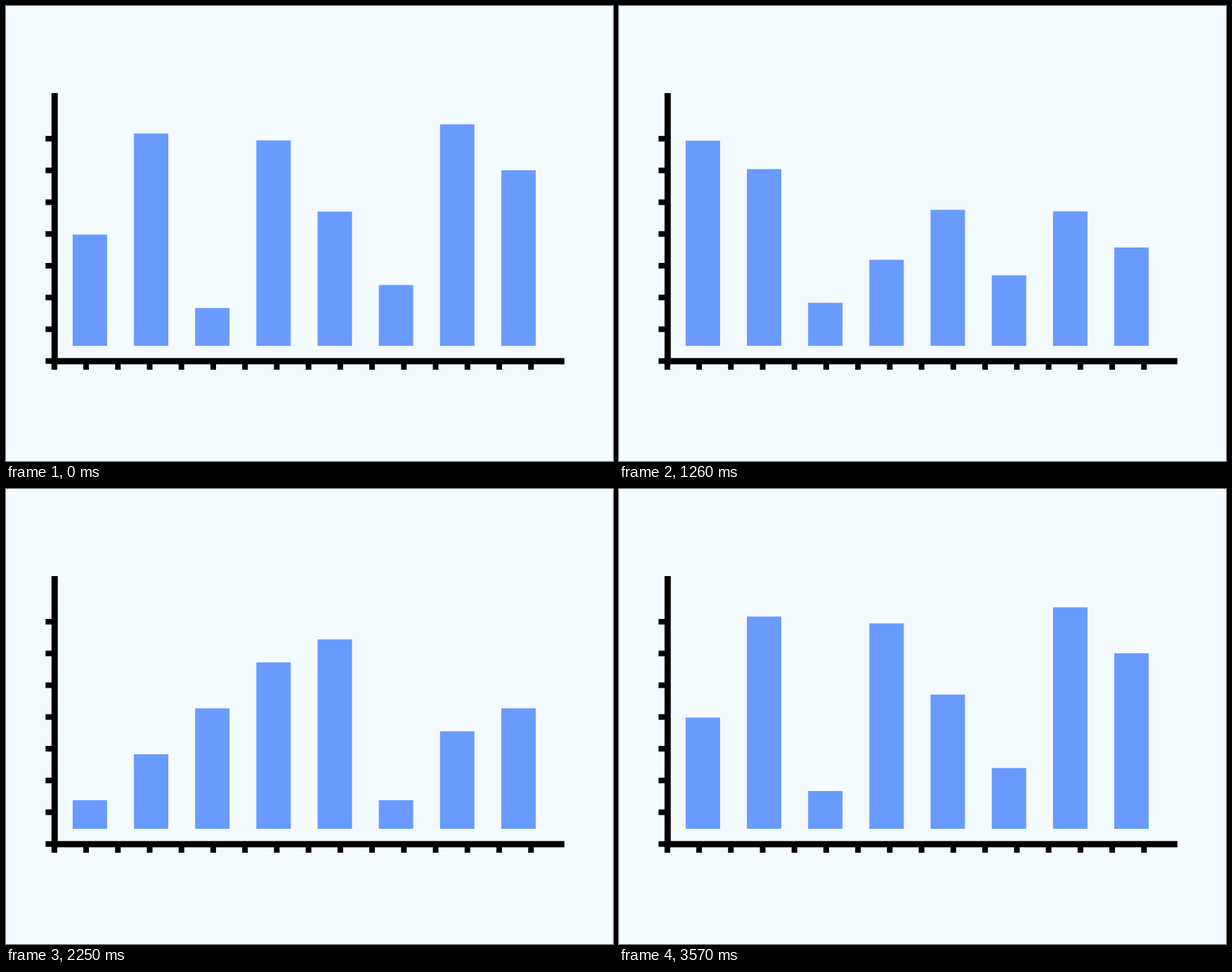
Recreate the animation shown at these times as a matplotlib script. Size 864 by 648 pixels, loop 3600 ms.

```python
import numpy as np
import matplotlib.pyplot as plt
from matplotlib.animation import FuncAnimation
from matplotlib.patches import Rectangle

W, H, DPI = 864, 648, 100
FRAMES, INTERVAL, BEAT = 120, 30, 15
PAPER, INK, BLUE = "#f4fbff", "#000000", "#699bff"

BAR_X, BAR_STEP, BAR_W, BASE = 94.9, 87.15, 49, 484
ZERO, PERCENT = 475.9, 3.27
AXIS_X, AXIS_Y, AXIS_W = 64.8, 501.4, 8.9
TICK, TICK_STEP = 8, 45.23

# Key poses in percent, by beat; beats without one are interpolated
POSES = {
    0: [46, 90, 14, 87, 56, 24, 94, 74],
    2: [34, 27, 53, 35, 72, 39, 31, 9],
    3: [93, 80, 12, 35, 55, 27, 59, 44],
    4: [73, 37, 83, 90, 19, 72, 1, 88],
    5: [10, 30, 50, 70, 80, 10, 40, 50],
    7: [16, 22, 51, 86, 23, 44, 62, 55],
}
POSES[8] = POSES[0]


def eased_beat(frame):
    """Position in beats, slowing down at each one; the last ends the loop."""
    beat, passed = divmod(frame, BEAT)
    p = passed / min(BEAT, FRAMES - 1 - beat * BEAT)
    return beat + p * p * (3 - 2 * p)


fig = plt.figure(figsize=(W / DPI, H / DPI), dpi=DPI, facecolor=PAPER)
ax = fig.add_axes([0, 0, 1, 1])
ax.set_xlim(0, W)
ax.set_ylim(H, 0)
ax.axis("off")


def box(x, y, w, h, color=INK):
    return ax.add_patch(Rectangle((x, y), w, h, facecolor=color, linewidth=0, snap=False))


# Axes with their ticks
box(AXIS_X, 124, AXIS_W, AXIS_Y + AXIS_W - 124)
box(AXIS_X, AXIS_Y, 730, AXIS_W)
for i in range(8):
    box(56.3, AXIS_Y + 0.2 - i * TICK_STEP, 10, TICK)
for i in range(16):
    box(AXIS_X + i * TICK_STEP, 509, TICK, 9)

bars = [box(BAR_X + i * BAR_STEP, BASE, BAR_W, 0, BLUE) for i in range(8)]


def draw(frame):
    beat = eased_beat(frame)
    for bar, values in zip(bars, zip(*POSES.values())):
        top = ZERO - PERCENT * np.interp(beat, list(POSES), values)
        bar.set_y(top)
        bar.set_height(BASE - top)
    return bars


anim = FuncAnimation(fig, draw, frames=FRAMES, interval=INTERVAL,
                     repeat=True, repeat_delay=0, blit=False)
plt.show()
```
